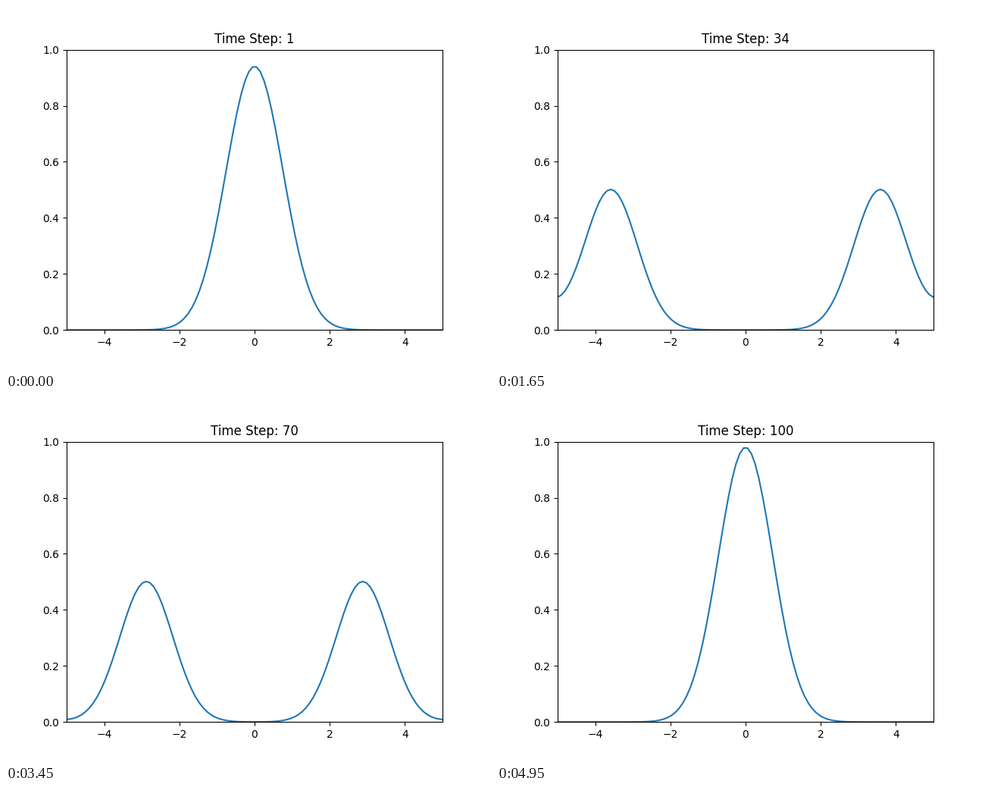
Recreate the animation shown at these times as a matplotlib script. Size 640x480 px, loop 5000 ms.

```python
import numpy as np
import matplotlib.pyplot as plt
from matplotlib.animation import FuncAnimation

STEPS = 100
WARMUP = 2  # steps taken before the first one shown


def solve_wave(pulse, count):
    """Leapfrog wave equation, unit Courant number, periodic ends."""
    rows = [pulse, pulse]
    while len(rows) < count:
        prev, now = rows[-2:]
        rows.append(np.roll(now, 1) + np.roll(now, -1) - prev)
    return rows


x = np.linspace(-5, 5, 100)
waves = solve_wave(np.exp(-x**2), STEPS + WARMUP + 1)

fig, ax = plt.subplots(figsize=(6.4, 4.8), dpi=100)
line, = ax.plot(x, waves[0], color="tab:blue", lw=1.5)
ax.set_xlim(-5, 5)
ax.set_ylim(0, 1)
title = ax.set_title("")


def update(i):
    step = i + 1
    line.set_ydata(waves[step + WARMUP])
    title.set_text(f"Time Step: {step}")
    return line, title


anim = FuncAnimation(fig, update, frames=STEPS, interval=50, repeat=True)
plt.show()
```
